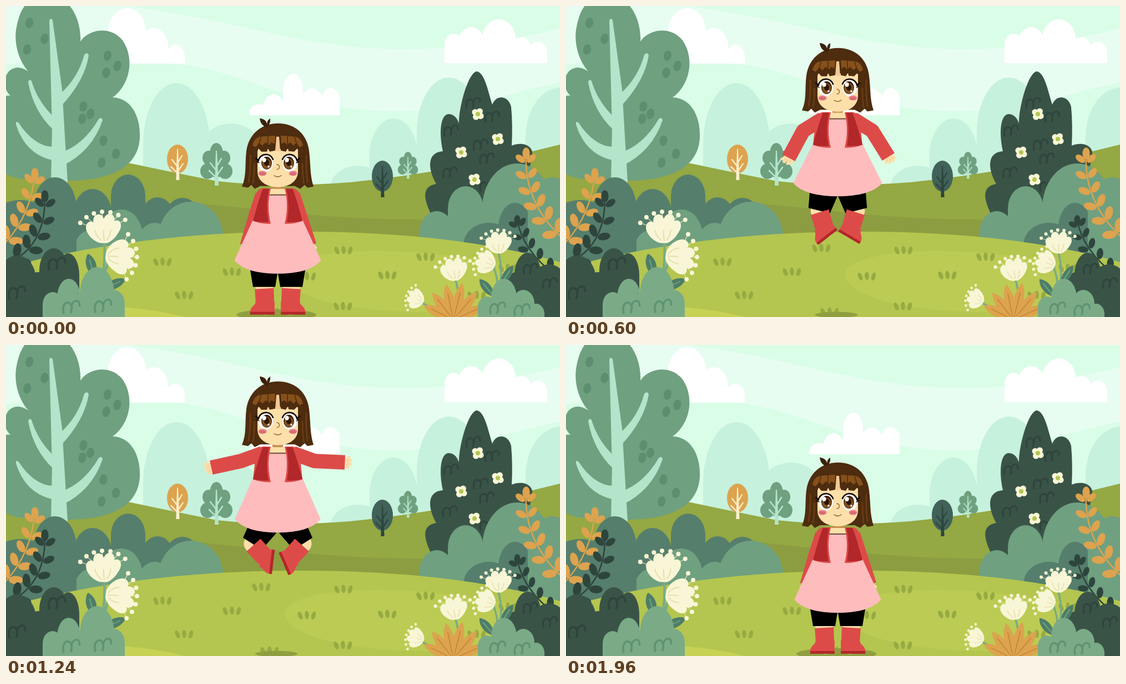
An HTML page with a canvas for the animation above (2.08 s loop, 998 by 561 pixels).

```html
<!DOCTYPE html>
<html lang="en">
<head>
<meta charset="utf-8">
<title>Meadow jump</title>
<style>
html, body { margin: 0; width: 100%; height: 100%; overflow: hidden; background: #dafde8; }
canvas { display: block; }
</style>
</head>
<body>
<canvas id="stage" width="998" height="561"></canvas>
<script>
const W = 998, H = 561, MID = 489.5, LOOP = 2080, STEP = 40, LAST = 1960, GROUND = 543;
const RED = '#dd4b49', DARK = '#b22729', SKIN = '#fddfa9', HAIR = '#4d2c0f', SHINE = '#86501a', PINK = '#ffbcbd';
const LEAF = '#6fa080', TEAL = '#557e6c', DEEP = '#3a5347', FRONT = '#7aab86', GOLD = '#dda34e', CREAM = '#f8f6d6';
const BARK = '#b4e5cb', NIGHT = '#2e453d', STEM = '#4e7d67';
const screen = document.getElementById('stage').getContext('2d');
const back = document.createElement('canvas');
back.width = W; back.height = H;
let g = back.getContext('2d');

// drawing helpers
const rad = deg => deg * Math.PI / 180;
function fill(color, d) { g.fillStyle = color; g.fill(new Path2D(d)); }
function line(color, width, d) {
  g.strokeStyle = color; g.lineWidth = width; g.lineCap = g.lineJoin = 'round';
  g.stroke(new Path2D(d));
}
function oval(color, x, y, rx, ry = rx, deg = 0) {
  g.fillStyle = color;
  g.beginPath(); g.ellipse(x, y, rx, ry, rad(deg), 0, 7); g.fill();
}
function dome(color, base, x, top, rx, ry = rx * 1.25) {
  g.fillStyle = color;
  g.beginPath(); g.ellipse(x, top + ry, rx, ry, 0, Math.PI, 2 * Math.PI);
  g.lineTo(x + rx, base); g.lineTo(x - rx, base); g.fill();
}
function domes(color, base, ...list) { list.forEach(d => dome(color, base, ...d)); }
function at(x, y, deg, scale, draw) {
  g.save(); g.translate(x, y); g.rotate(rad(deg)); g.scale(scale, scale); draw(); g.restore();
}
function mirrored(draw) { g.save(); g.translate(2 * MID, 0); g.scale(-1, 1); draw(); g.restore(); }

function tuft(x, y) {
  for (const k of [-1, 0, 1]) oval('#96aa43', x + k * 12, y + Math.abs(k), 3.8, 7.5, k * 20 - 4);
}
function mark(color, x, y, s = 1) {
  at(x, y, 0, s, () => line(color, 3.2, 'M-12 9C-15-6-5-12 0-2C3-12 13-12 12-2M0-2C1 2 0 5-1 8'));
}
function sprig(color, x0, y0, cx, cy, x1, y1, n, size) {
  line(color, 2.6, `M${x0} ${y0}Q${cx} ${cy} ${x1} ${y1}`);
  for (let i = 0; i < n; i++) {
    const u = (i + .4) / n, v = 1 - u;
    const x = v * v * x0 + 2 * u * v * cx + u * u * x1, y = v * v * y0 + 2 * u * v * cy + u * u * y1;
    const a = Math.atan2(v * (cy - y0) + u * (y1 - cy), v * (cx - x0) + u * (x1 - cx)) * 180 / Math.PI;
    const s = size * (1.1 - u * .3);
    for (const k of [-1, 1]) at(x, y, a + k * 50, 1, () => oval(color, s + 3, 0, s, s * .58));
  }
  oval(color, x1, y1, size * .55, size * .9);
}
function flower(x, y, deg, s) {
  at(x, y, deg, s, () => {
    for (let i = -3; i <= 3; i++) {
      const a = i * .27, px = 56 * Math.sin(a), py = -56 * Math.cos(a);
      line('#dfe8bd', 1.2, `M0-20L${px} ${py}`);
      oval(CREAM, px, py, 4);
    }
    fill(CREAM, 'M-7 0C-25-6-34-25-30-34C-25-43-18-39-17-38C-18-55 0-56 2-43C10-58 24-50 21-38C33-42 36-27 27-17Q18-3 5 1Z');
    line('#e4dfad', 2, 'M-5-5Q-14-13-15-23M0-4L0-22M5-5Q12-12 13-22');
  });
}
function blossom(x, y) {
  for (let i = 0; i < 4; i++) oval(CREAM, x + 6 * Math.cos(i * 1.57 + .6), y + 6 * Math.sin(i * 1.57 + .6), 5.6);
  oval('#b3c552', x, y, 4);
}
function leaf(color, vein, x, y, deg, len, wide) {
  at(x, y, deg, 1, () => {
    fill(color, `M0 0C${-wide} ${-len * .4} ${-wide * .7} ${-len * .8} 0 ${-len}C${wide * .7} ${-len * .8} ${wide} ${-len * .4} 0 0Z`);
    line(vein, 1.6, `M0 0V${-len * .75}`);
  });
}

function sky() {
  g.fillStyle = '#dafde8'; g.fillRect(0, 0, W, H);
  fill('#e7fdf1', 'M0 0H215C320 12 430 40 540 62C660 84 820 88 998 40V138C900 156 840 188 700 190C520 188 450 125 322 106C220 96 100 90 0 106Z');
  domes('#fff', 104, [218, 4, 34], [266, 40, 26], [305, 70, 17]);
  domes('#fff', 197, [456, 177, 18, 17], [482, 159, 18], [517, 122, 18, 32], [551, 149, 20], [585, 148, 16]);
  domes('#fff', 103, [806, 50, 16], [838, 38, 25], [888, 24, 31], [928, 56, 19], [958, 64, 17]);
  domes('#c6f1dc', 350, [307, 139, 60, 110], [405, 212, 52, 42], [698, 203, 43, 66], [798, 129, 58, 100],
    [1000, 147, 64, 90], [634, 288, 50, 40]);
}
function farHill() {
  fill('#94a843', 'M0 300Q120 268 225 284Q300 300 380 316Q490 328 620 318Q800 300 998 250V561H0Z');
  fill('#8c9d41', 'M300 352C430 362 560 384 720 385L998 390V561H200Z');
}
function meadow() {
  fill('#b4c64f', 'M0 472Q230 409 510 407Q800 405 998 462V561H0Z');
  fill('#bbcb54', 'M900 466C720 430 520 434 502 482C500 520 600 556 800 552H920Z');
  fill('#c7d254', 'M180 541Q260 545 322 561H180Z');
  for (let i = 0; i < 4; i++) {
    tuft(460 + 148 * i, 436 + 4 * i * i);
    tuft(282 + 120 * i + 5 * i * i, 461 + 23 * i - 5 * i * i);
  }
  tuft(321, 521); tuft(475, 551); tuft(607, 541); tuft(848, 521);
}
function trunk(color) {
  fill(color, 'M-1-24L-3 39H4L1-24Z');
  line(color, 2.6, 'M0 22L11 6M0 12L-11-2M0 5L9-10M0 25L-13 12');
}
function roundTree(x, y, rx, ry, color, wood) {
  oval(color, x, y, rx, ry);
  at(x, y + 3, 0, .9, () => trunk(wood));
}
function lobedTree(x, y, s) {
  at(x, y, 0, s, () => {
    oval(LEAF, 0, -18, 12, 20); oval(LEAF, 0, 8, 20, 16);
    for (const k of [-1, 1]) { oval(LEAF, k * 14, -11, 11, 13); oval(LEAF, k * 16, 13, 13, 14); }
    trunk(BARK);
  });
}
function bigTree() {
  fill(LEAF, 'M40 118C20 95 14 62 19 38C25 5 40-20 75-20C115-20 136 25 134 64C150 40 190 36 210 62C232 94 224 142 192 165C225 165 243 200 241 238C238 290 190 315 112 315L40 312C20 312 8 308-5 300V165Q2 160 8 162C-5 150-5 130 5 118Q20 104 40 118Z');
  for (const [x, y, r] of [[50, 56, 28], [188, 106, 18], [182, 264, 23], [143, 193, 13]])
    for (let i = 0; i < 3; i++) oval('#5c8e6f', x + r * .7 * Math.cos(i * 2.1 + 4.3), y + r * Math.sin(i * 2.1 + 4.3), 7, 9.5, 12);
  fill(BARK, 'M78 26Q81 20 84 26L101 150L111 318H81L83 220Z');
  fill(BARK, 'M96 160Q130 130 141 88Q146 82 149 89Q142 135 98 182Z');
  fill(BARK, 'M84 198Q56 170 46 135Q41 131 40 138Q50 190 84 222Z');
  fill(BARK, 'M100 264Q140 250 167 204Q172 199 174 206Q155 262 102 288Z');
  fill(BARK, 'M83 254Q50 252 23 211Q17 206 18 214Q35 267 83 278Z');
}
function darkTree() {
  fill(DEEP, 'M848 118C862 120 868 152 876 178C882 160 905 160 910 182Q913 215 911 252C930 244 950 252 948 268Q946 300 900 380H768C750 345 750 325 775 321C758 290 760 264 787 262C780 230 782 198 796 195Q810 194 816 212C816 180 833 120 848 118Z');
  for (let i = 0; i < 7; i++) mark(NIGHT, 842 + 42 * Math.sin(i * 2.2), 175 + i * 25);
  blossom(850, 195); blossom(886, 240); blossom(820, 264); blossom(844, 313);
}
function bushes() {
  domes(TEAL, 480, [156, 330, 34], [220, 304, 31], [273, 345, 30], [318, 346, 34]);
  domes(LEAF, 480, [333, 353, 58, 62], [208, 367, 38], [268, 391, 32], [152, 404, 30, 40]);
  domes(TEAL, 480, [88, 309, 39, 55], [26, 350, 60, 50]);
  darkTree();
  domes(LEAF, 480, [828, 325, 32], [776, 370, 31], [921, 284, 63, 80]);
  domes(TEAL, 480, [870, 391, 46, 40], [917, 355, 30, 45]);
  dome(LEAF, 480, 984, 309, 44, 65);
}
function leftCorner() {
  sprig(GOLD, -6, 432, 45, 380, 52, 303, 5, 12);
  sprig(NIGHT, 8, 462, 72, 430, 70, 343, 5, 12);
  domes(DEEP, 561, [20, 450, 34], [86, 437, 26, 40], [112, 446, 20, 40], [60, 480, 50]);
  mark(NIGHT, 20, 517, 1.2); mark(NIGHT, 92, 465, 1.2);
  line(FRONT, 4.5, 'M177 425Q180 465 168 530M186 456Q174 490 166 540');
  leaf(STEM, FRONT, 160, 490, -16, 45, 14);
  leaf(STEM, FRONT, 172, 512, 66, 48, 13);
  flower(177, 427, -4, 1); flower(180, 451, 92, 1);
  domes(FRONT, 561, [84, 516, 18], [113, 492, 21, 34], [164, 471, 31, 48], [194, 512, 20]);
  mark('#5f9473', 118, 543, 1.2); mark('#5f9473', 175, 541, 1.2);
}
function rightCorner() {
  sprig(GOLD, 1004, 420, 932, 355, 937, 266, 6, 12);
  sprig(NIGHT, 990, 486, 930, 440, 921, 386, 5, 10);
  domes(DEEP, 561, [940, 445, 24, 40], [978, 466, 34, 40], [920, 480, 24]);
  mark(NIGHT, 945, 474); mark(NIGHT, 980, 500);
  line(FRONT, 3.6, 'M887 444Q896 480 888 520M878 470Q890 500 884 530M809 492Q820 525 814 561M750 536Q770 545 776 561');
  leaf(STEM, FRONT, 880, 525, -40, 42, 12);
  leaf(STEM, FRONT, 890, 505, 32, 44, 11);
  flower(888, 446, -3, .75); flower(880, 469, -68, .68); flower(810, 495, -10, .78); flower(752, 533, -72, .58);
  for (let i = -3; i < 3; i++) leaf(GOLD, '#c2853a', 806, 566, i * 26 + 14, 68 - Math.abs(i) * 3, 14);
  domes(FRONT, 561, [866, 524, 16], [897, 492, 23, 34], [932, 512, 20], [955, 537, 15]);
  mark('#5f9473', 886, 545, 1.1); mark('#5f9473', 930, 548, 1.1);
}
function scenery() {
  sky(); farHill();
  roundTree(309, 276, 19, 26, GOLD, '#fbeecb');
  roundTree(678, 307, 19, 28, '#416259', NIGHT);
  lobedTree(379, 285, 1); lobedTree(724, 287, .63);
  bigTree(); bushes(); meadow();
  leftCorner(); rightCorner();
}

// motion: crouch, spring up, hang, drop, settle
const clamp = u => Math.min(1, Math.max(0, u));
const ease = u => (1 - Math.cos(Math.PI * clamp(u))) / 2;
const PEAK = 1080, TOP = 158, DIP = 15;
function height(t) {
  if (t < PEAK) return (TOP + DIP) / (1 + Math.exp((460 - t) / 70)) - DIP * ease(t / 200);
  const fall = TOP - 62 * ((t - PEAK) / 360) ** 2;
  return Math.max(fall, -DIP * (1 - ease((t - 1680) / 280)));
}
// limb angles in degrees; air: +1 floats cloth up, -1 pulls it straight
const STAND = { arm: 18, fore: 17, thigh: 0, shin: 3, foot: 0, air: 0 };
const CROUCH = { arm: 69, fore: 36, thigh: 26, shin: 37, foot: 0, air: 0 };
const PUSH = { arm: 65, fore: 44, thigh: 28, shin: 37, foot: -21, air: 0 };
const FLOAT = { arm: 58, fore: 30, thigh: 14, shin: 17, foot: -38, air: .3 };
const CHEER = { arm: 109, fore: 133, thigh: 59, shin: 75, foot: -107, air: .8 };
const DROP = { arm: 24, fore: 23, thigh: 1, shin: 3, foot: -55, air: -1.2 };
const ACTS = [[0, STAND], [200, CROUCH], [360, PUSH], [600, FLOAT], [1060, CHEER], [1440, DROP], [1680, CROUCH], [LAST, STAND]];
function poseAt(t) {
  const i = Math.max(1, ACTS.findIndex(a => a[0] >= t));
  const [t0, p] = ACTS[i - 1], [t1, q] = ACTS[i], u = ease((t - t0) / (t1 - t0)), mix = {};
  for (const k in p) mix[k] = p[k] + (q[k] - p[k]) * u;
  return mix;
}

// the girl; limbs are drawn for the left side and mirrored
function limb(color, x0, y0, x1, y1, w0, w1) {
  const d = Math.hypot(x1 - x0, y1 - y0) || 1, nx = (y1 - y0) / d, ny = (x0 - x1) / d;
  fill(color, `M${x0 + nx * w0} ${y0 + ny * w0}L${x1 + nx * w1} ${y1 + ny * w1}L${x1 - nx * w1} ${y1 - ny * w1}L${x0 - nx * w0} ${y0 - ny * w0}Z`);
}
function leg(p, foot, floor) {
  const a = rad(p.thigh), b = rad(p.shin), hx = 465, hy = 471, len = 36 + 22 * (1 - Math.cos(a));
  const kx = hx - len * Math.sin(a), ky = hy + len * Math.cos(a);
  const ax = kx + 35 * Math.sin(b), ay = Math.min(floor, ky + 35 * Math.cos(b));
  line(SKIN, 31, `M${hx} ${hy}L${kx} ${ky}L${ax} ${ay}`);
  limb('#000', hx, hy, kx, ky, 26, 20);
  const d = Math.hypot(kx - ax, ky - ay), n = Math.min(33, d - 3) / d;
  limb(RED, ax, ay, ax + (kx - ax) * n, ay + (ky - ay) * n, 16.5, 17);
  oval(RED, ax, ay, 15.5, 14);
  at(ax, ay, foot, 1, () => {
    fill(RED, 'M-17-9C-17-1-27 0-27 10V13H17V-9Z');
    fill(DARK, 'M-27 10H17V15H-27Z');
  });
}
function arm(upper, lower) {
  const a = rad(upper), b = rad(lower);
  const ex = 462 - 41 * Math.sin(a), ey = 341 + 41 * Math.cos(a), wx = ex - 55 * Math.sin(b), wy = ey + 55 * Math.cos(b);
  at(wx, wy, lower, 1, () => {
    oval(SKIN, 0, 0, 9, 7);
    line(SKIN, 5.5, 'M-4 0L-9 7M-2 0L-4 10M2 0L3 10M4 0L9 6');
    line('#e8bd84', 1, 'M-5 7L-4 3M0 8V4M6 6L4 3');
  });
  g.strokeStyle = RED; g.lineWidth = 26; g.lineCap = 'butt'; g.lineJoin = 'round';
  g.beginPath(); g.moveTo(462, 341); g.lineTo(ex, ey); g.lineTo(wx, wy); g.stroke();
}
function hair(n) {
  const y = 325 + n;
  fill(HAIR, `M490 212C523 212 543 234 546 262C549 285 547 304 554 ${y}L543 ${y + 2}L538 ${y - 3}L530 ${y + 4}L520 ${y - 1}H458L448 ${y + 4}L442 ${y - 3}L436 ${y + 2}L425 ${y}C434 306 430 285 433 262C437 233 458 212 490 212Z`);
  line('#6b3d14', 2.6, `M440 270Q441 296 437 ${y - 8}M541 270Q540 296 543 ${y - 8}M447 285Q448 303 445 ${y - 6}M534 285Q534 303 536 ${y - 6}`);
  fill('#3a2009', 'M457 203Q471 204 471 219Q459 217 457 203ZM476 203Q468 208 471 218Q477 212 476 203Z');
}
function eye() {
  oval('#fff', 468, 284, 13, 15);
  oval('#3a1e0a', 469.5, 283.5, 9.5, 11.5);
  oval('#80501f', 469.5, 285, 8.3, 9.5);
  oval('#2a1506', 469.5, 283, 4.6, 5.8);
  line('#120a05', 2.6, 'M454 280Q458 268 469 268Q478 269 481 277M455 279L450 275');
  line('#120a05', 1.4, 'M456 283L451 281');
}
function face() {
  fill(SKIN, 'M453 258H526V298C526 318 508 327 490 327C471 327 453 318 453 298Z');
  eye(); mirrored(eye);
  for (const x of [465, 506]) { oval('#fff', x, 278, 3.6, 4); oval('#fff', x + 8, 290, 1.8); }
  for (const x of [462, 517]) { oval('#e8838c', x, 302, 7.5, 4.5); oval('#d96b77', x, 303, 6, 3); }
  line('#8b5423', 1.3, 'M488 286Q494 287 492 293Q491 295 488 295M483 306Q489 311 496 306');
  fill(HAIR, 'M445 280C441 245 465 222 490 222C515 222 538 245 534 280L527 264L525 257L519 263L509 262L508 256L504 263L495 261L493 236H487L485 261L475 263L472 257L470 263L460 263L455 257L451 268Z');
  fill(SHINE, 'M444 252Q447 238 458 236L485 234L484 249L478 246L474 251L468 246L462 252L456 247L450 255ZM535 252Q532 238 521 236L495 234L496 249L502 246L506 251L512 246L518 252L523 247L529 255Z');
  line(HAIR, 1.5, 'M472 235V250M459 237L456 250M507 235V250M520 237L524 250');
  fill('#f2c995', 'M487 236H492L494 262H485Z');
}
function jacket() {
  fill(RED, 'M477 329H462Q452 331 450 342L445 388Q460 394 477 393Q469 361 477 329Z');
  fill(DARK, 'M474 330H463Q457 343 445 388Q460 391 473 390Q467 359 474 330Z');
}
function dress(hem, w) {
  const l = MID - w, r = MID + w, c = hem - 24;
  fill(SKIN, 'M473 330H506V348H473Z');
  fill(PINK, `M470 342H509L535 388L${r} ${c}C${r - 14} ${hem - 7} ${MID + 36} ${hem} ${MID} ${hem}C${MID - 36} ${hem} ${l + 14} ${hem - 7} ${l} ${c}L444 388Z`);
  line('#6d4a42', 2, 'M475 341H504');
}
function girl(t) {
  const up = height(t), p = poseAt(t), floor = GROUND + up;
  const shade = 38 + 34 * (1 - up / TOP) ** 2;
  oval('#8f9f40', 487, 557, shade, shade * .14);
  g.save(); g.translate(0, -up);
  leg(p, p.foot, floor);
  mirrored(() => leg(p, p.foot * .8, floor));
  at(0, 4 * p.air, 0, 1, () => hair(1 - 5 * p.air));
  fill(SKIN, 'M480 312H499V345H480Z');
  fill('#c98a4e', 'M480 312H499V330Q490 332 480 330Z');
  at(0, 4 * p.air, 0, 1, face);
  arm(p.arm, p.fore * .94);
  mirrored(() => arm(p.arm, p.fore * 1.06));
  dress(483 - 8 * p.air, 78 + 7 * p.air);
  jacket(); mirrored(jacket);
  g.restore();
}

scenery();
g = screen;
const start = performance.now();
function frame(now) {
  const t = Math.max(0, now - start) % LOOP;
  g.drawImage(back, 0, 0);
  girl(Math.min(LAST, Math.floor(t / STEP) * STEP));
  requestAnimationFrame(frame);
}
frame(start);
</script>
</body>
</html>
```
